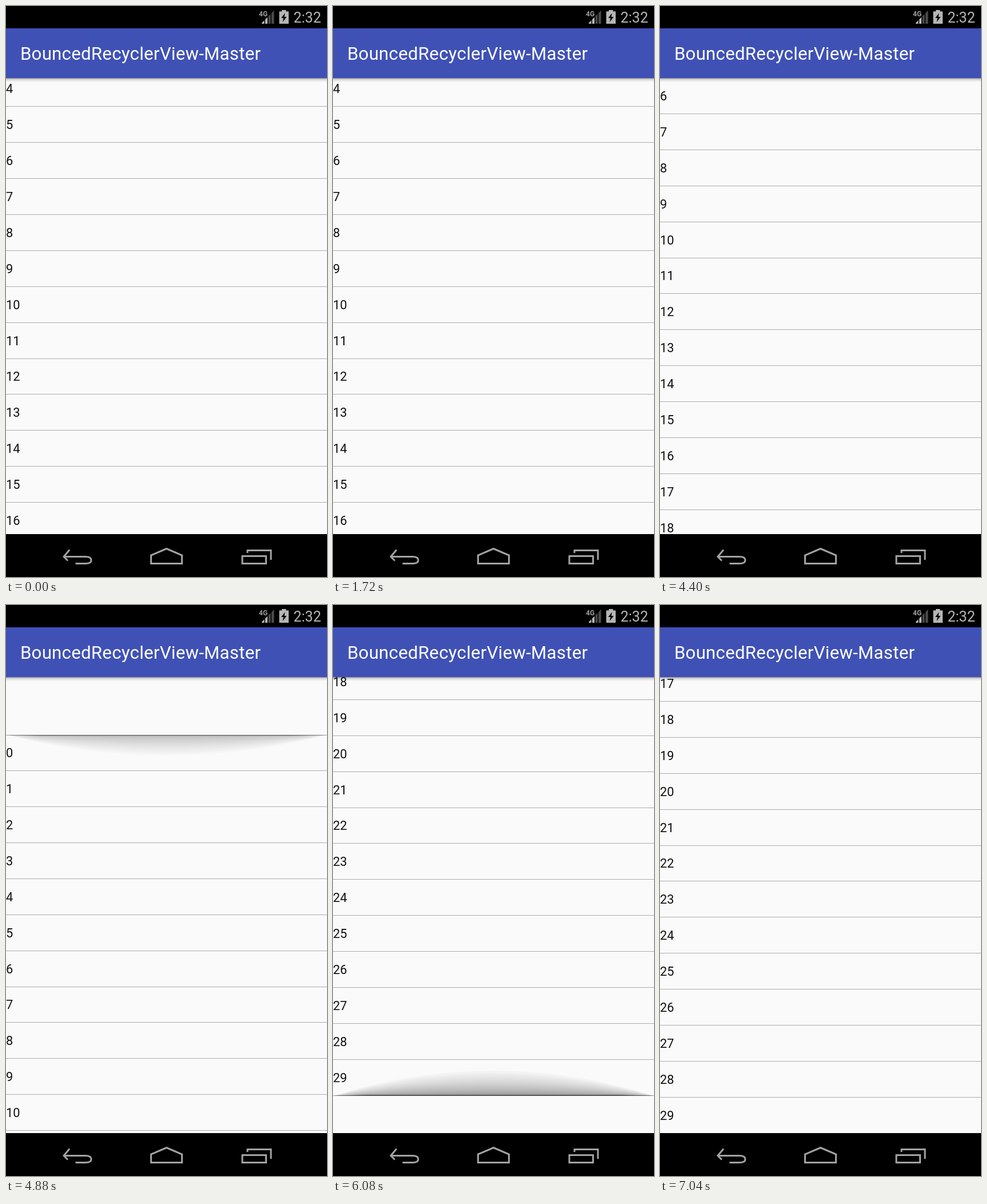
Animation of 561 by 998 pixels, one loop 8.92 s. Source, as an HTML page:

```html
<!DOCTYPE html>
<html lang="en">
<head>
<meta charset="utf-8">
<title>Bouncing list</title>
<style>
  html, body { margin: 0; width: 100%; height: 100%; overflow: hidden; background: #000; }
  svg { display: block; width: 100vw; height: 100vh; font-family: Roboto, "Open Sans", sans-serif; }
  .row text { font-size: 21.8px; fill: #101010; }
  .title { font-size: 31.2px; letter-spacing: .27px; fill: #fff; }
  .clock { font-size: 25px; fill: #b6b6b6; }
  .net { font-size: 12px; font-weight: 700; fill: #a0a0a0; }
  .nav { fill: none; stroke: #a3a3a3; stroke-width: 3; }
</style>
</head>
<body>
<svg viewBox="0 0 561 998" preserveAspectRatio="none">
  <defs>
    <clipPath id="view"><rect y="126" width="561" height="797"/></clipPath>
    <linearGradient id="shade" x2="0" y2="1">
      <stop offset="0" stop-color="#000" stop-opacity=".42"/>
      <stop offset=".35" stop-color="#000" stop-opacity=".14"/>
      <stop offset="1" stop-color="#000" stop-opacity="0"/>
    </linearGradient>
  </defs>
  <rect width="561" height="998"/>
  <rect y="126" width="561" height="797" fill="#fafafa"/>
  <g clip-path="url(#view)">
    <g id="rows"></g>
    <g id="topGlow"></g>
    <g id="endGlow"></g>
  </g>
  <rect y="126" width="561" height="7" fill="url(#shade)"/>
  <rect y="39" width="561" height="87" fill="#3f51b5"/>
  <text class="title" x="24.9" y="94">BouncedRecyclerView-Master</text>

  <text class="net" x="442" y="18">4G</text>
  <path fill="#b6b6b6" d="M447 31V29.500L451.500 25V31ZM453 31V23.500L457 19.500V31Z"/>
  <path fill="#4a4a4a" d="M458.500 31V18L462.500 14V31ZM464 31V12.500L468.500 7.500V31Z"/>
  <path fill="#b6b6b6" d="M482 7H489.500V9.500H494V31H477.500V9.500H482Z"/>
  <path d="M487.500 12.500L481 21H485L483.500 28L490.500 19H486.500Z"/>
  <text class="clock" x="502.500" y="29">2:32</text>

  <g class="nav">
    <path d="M111 950.500L101 962.500L108 969.500M101 962.500H139C146 962.500 149 965 149 968.500S146 974.500 139 974.500H121.500"/>
    <path d="M253.500 974.500V960L280.500 948.500L307.500 960V974.500Z"/>
    <path d="M413 961.500H454.500V974.500H413ZM422 956V951.500H463V968"/>
  </g>
</svg>
<script>
const LOOP = 8920, STEP = 40;
const TOP = 126.5, PITCH = 62.87, COUNT = 30, END = 1089.6;
const NS = "http://www.w3.org/2000/svg";
const $ = id => document.getElementById(id);

function add(parent, tag, attrs) {
  const el = parent.appendChild(document.createElementNS(NS, tag));
  for (const key in attrs) el.setAttribute(key, attrs[key]);
  return el;
}

const easeOut = p => u => 1 - (1 - u) ** p;
const easeIn = p => u => u ** p;

// start time, end time, start value, end value, easing
const scrollMoves = [
  [3760, 4400, 264.85, 378, easeOut(1.85)],
  [4440, 4800, 378, -40, easeIn(1.8)],
  [4800, 4920, -40, -108, easeOut(2)],
  [4920, 5480, -108, 0, easeOut(2.5)],
  [5720, 6040, 0, 1100, easeIn(1.4)],
  [6040, 6160, 1100, 1200, easeOut(2)],
  [6160, 6640, 1200, END, easeOut(2.5)]
];
const topGlowMoves = [
  [4720, 4880, 0, 1, easeOut(2)],
  [4920, 5480, 1, 0, easeOut(1.5)]
];
const endGlowMoves = [
  [6000, 6080, 0, 1, easeOut(2)],
  [6160, 7040, 1, 0, easeOut(1.5)]
];

function valueAt(moves, t) {
  let value = moves[0][2];
  for (const [start, end, from, to, ease] of moves) {
    if (t < start) break;
    value = from + (to - from) * ease(Math.min(1, (t - start) / (end - start)));
  }
  return value;
}

const rows = Array.from({ length: COUNT }, (_, i) => {
  const g = add($("rows"), "g", { class: "row" });
  add(g, "rect", { width: 561, height: 1, fill: "#acacac" });
  add(g, "text", { x: 0, y: -22.7 }).textContent = i;
  return g;
});
const topLine = add($("rows"), "rect", { width: 561, height: 1, fill: "#acacac" });

// Nested arcs build a soft glow that is darkest at the edge.
function makeGlow(g, depth) {
  const arcs = add(g, "g", {});
  for (let k = 1; k <= 24; k++) {
    const h = 2 * depth * (k / 24) ** 2.5;
    add(arcs, "path", { d: `M0 0Q280.5 ${h} 561 0Z`, "fill-opacity": .028 });
  }
  add(g, "path", { d: "M0 0H561L500 2H60Z", fill: "#444", "fill-opacity": .75 });
  return (y, dir, level, strength) => {
    g.setAttribute("transform", `translate(0 ${y}) scale(1 ${dir})`);
    g.setAttribute("opacity", Math.min(1, level * 1.2) * strength);
    arcs.setAttribute("transform", `scale(1 ${level})`);
  };
}
const drawTopGlow = makeGlow($("topGlow"), 36);
const drawEndGlow = makeGlow($("endGlow"), 44);

function draw(t) {
  const top = TOP - valueAt(scrollMoves, t);
  rows.forEach((row, i) => {
    row.setAttribute("transform", `translate(0 ${Math.floor(top + PITCH * (i + 1))})`);
  });
  topLine.setAttribute("y", Math.floor(top + .5));
  drawTopGlow(Math.floor(top + .5), 1, valueAt(topGlowMoves, t), .65);
  drawEndGlow(Math.floor(top + PITCH * COUNT) + 1, -1, valueAt(endGlowMoves, t), 1);
}

const begin = performance.now();
function tick() {
  const t = (performance.now() - begin) % LOOP;
  draw(Math.floor(t / STEP) * STEP);
  requestAnimationFrame(tick);
}
tick();
</script>
</body>
</html>
```
